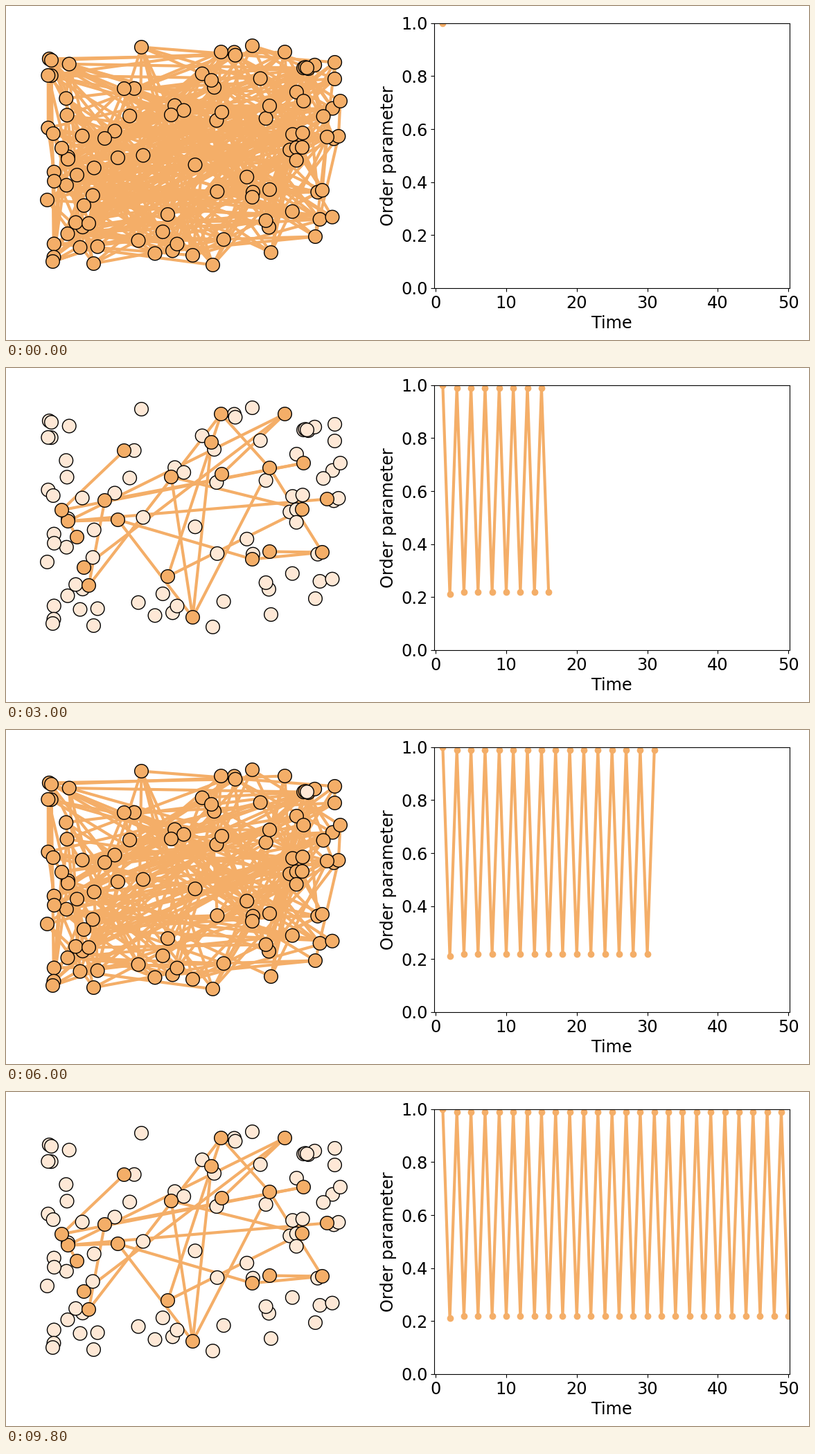
Write a matplotlib script that moves like this. It is 1159 px wide and 483 px high and loops after 10000 ms.

```python
import numpy as np
import matplotlib.pyplot as plt
from matplotlib.animation import FuncAnimation
from matplotlib.collections import LineCollection

W, H, DPI = 1159, 483, 100
STEPS, STEP_MS = 50, 200
N = 100
ACTIVE, IDLE = "#f4ae68", "#fee8d6"

plt.rcParams.update({"font.family": "DejaVu Sans", "font.size": 17.28})
rng = np.random.default_rng(7)

# Core nodes (pixels, y down) stay active. They form two chains and four spurs.
CHAIN_A = [(170, 119), (80, 205), (429, 137), (142, 191), (119, 314), (310, 66),
           (380, 144), (456, 266), (355, 276), (161, 219), (89, 221), (402, 66),
           (311, 153)]
CHAIN_B = [(296, 107), (269, 360), (238, 157), (427, 204), (233, 301)]
SPURS = [(463, 189), (102, 244), (112, 288), (380, 265)]
CORE = CHAIN_A + CHAIN_B + SPURS
LATECOMER = 19      # joins the core from the second quiet step

# The loner is cut off on every busy step after the first.
LONER = len(CORE)
RIM = [(434, 89), (65, 78), (195, 59), (355, 57), (474, 105), (482, 137),
       (446, 333), (382, 356), (298, 374), (126, 372), (67, 369), (59, 280)]


def scatter_nodes(count):
    """Random nodes in the cloud's box, denser towards its sides."""
    x = 60 + 420 * rng.beta(0.7, 0.7, count)
    y = 64 + 306 * rng.beta(0.85, 0.85, count)
    return np.column_stack([x, y])


def chain(start, count):
    return [(k, k + 1) for k in range(start, start + count - 1)]


def tour(members):
    order = rng.permutation(members)
    return list(zip(order, np.roll(order, 1)))


nodes = np.vstack([CORE, RIM, scatter_nodes(N - len(CORE) - len(RIM))])
core_links = (chain(0, len(CHAIN_A)) + chain(len(CHAIN_A), len(CHAIN_B))
              + [(17, 5), (14, 6), (14, 9), (18, 10), (19, 10), (20, 11), (21, 7)])
linked = np.delete(np.arange(N), LONER)
busy_links = tour(linked) + tour(linked) + tour(linked)[:40]
all_links = busy_links + core_links + tour(np.arange(N))


def state(t):
    """Active links and active-node mask at time t."""
    mask = np.ones(N, bool)
    if t == 1:
        return all_links, mask
    if t % 2:
        mask[LONER] = False
        return busy_links, mask
    mask[len(CORE):] = False
    mask[LATECOMER] = t > 2
    return [(a, b) for a, b in core_links if mask[a] and mask[b]], mask


times = np.arange(1, STEPS + 1)
states = [state(t) for t in times]
order_param = np.array([mask.mean() for _, mask in states])

fig = plt.figure(figsize=(W / DPI, H / DPI), dpi=DPI, facecolor="white")

# Whole coordinates fall on pixel centres.
net = fig.add_axes([0, 0, 1, 1])
net.set(xlim=(-0.5, W - 0.5), ylim=(H - 0.5, -0.5))
net.axis("off")
links = net.add_collection(LineCollection([], colors=ACTIVE, linewidths=3, zorder=1))
# Core nodes are drawn last so that they lie on top.
draw_order = np.arange(N)[::-1]
dots = net.scatter(*nodes[draw_order].T, s=200, edgecolors="black",
                   linewidths=1, zorder=2)

left, right, top, bottom = 618.2, 1131.2, 24.8, 407.8
chart = fig.add_axes([left / W, 1 - bottom / H, (right - left) / W, (bottom - top) / H])
chart.set(xlim=(-0.2, 50.2), ylim=(0, 1), xticks=range(0, 51, 10),
          xlabel="Time", ylabel="Order parameter")
curve, = chart.plot([], [], "o-", color=ACTIVE, lw=3, ms=6)


def update(i):
    pairs, mask = states[i]
    links.set_segments([nodes[list(pair)] for pair in pairs])
    dots.set_facecolors([ACTIVE if on else IDLE for on in mask[draw_order]])
    curve.set_data(times[:i + 1], order_param[:i + 1])
    return links, dots, curve


anim = FuncAnimation(fig, update, frames=STEPS, interval=STEP_MS,
                     repeat=True, repeat_delay=0)
plt.show()
```
